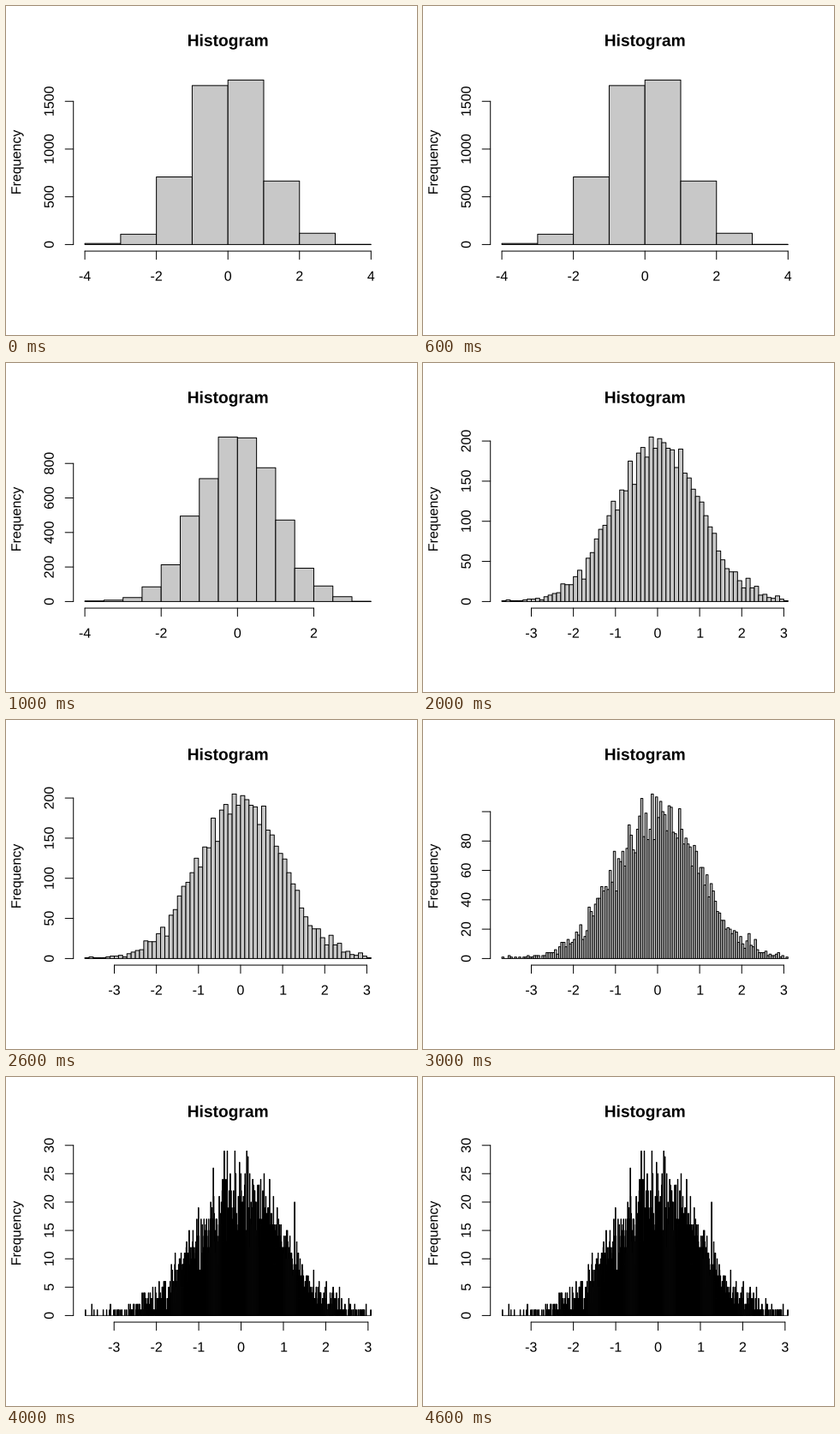
Write a matplotlib script that moves like this. It is 480 px wide and 384 px high and loops after 5000 ms.

```python
import numpy as np
import matplotlib.pyplot as plt
from matplotlib.animation import FuncAnimation
from matplotlib.collections import PolyCollection
from matplotlib.patches import PathPatch
from matplotlib.textpath import TextPath
from matplotlib.transforms import Affine2D

W, H, DPI = 480, 384, 96
LEFT, RIGHT = 92.09, 426.31      # first and last break
BASE, TOP = 278.4, 86.4          # zero and tallest bar
AXIS_X, AXIS_Y = 78.72, 286.08
TICK = 9.6
MID_X, MID_Y = 259.2, 182.4
LINE = 72 / DPI

START, STEP = -4, 0.01
# sample sizes per half unit from -4 to 3.5
HALVES = [3, 8, 23, 85, 213, 495, 712, 953, 948, 775, 472, 193, 90, 28, 1]


def sample(lo=-3.69, hi=3.07):
    """Scatter each half unit over bins of 0.01, following a normal curve."""
    rng = np.random.default_rng(7)
    x = START + STEP * (np.arange(50 * len(HALVES)) + 0.5)
    density = np.exp(-x**2 / 2) * ((x > lo) & (x < hi))
    groups = density.reshape(-1, 50)
    return np.concatenate([rng.multinomial(n, g / g.sum())
                           for n, g in zip(HALVES, groups)])


FINE = np.pad(sample(), (0, 50))


def counts(width, lo, hi, peak):
    a, b = (round((v - START) / STEP) for v in (lo, hi))
    size = round(width / STEP)
    return np.minimum(FINE[a:b].reshape(-1, size).sum(axis=1), peak)


# bin width, first break, last break, peak, x ticks, y ticks, highest y label
VIEWS = [
    (1, -4, 4, 1723, range(-4, 5, 2), range(0, 1501, 500), 1500),
    (0.5, -4, 3.5, 953, range(-4, 3, 2), range(0, 801, 200), 800),
    (0.1, -3.7, 3.1, 205, range(-3, 4), range(0, 201, 50), 200),
    (0.05, -3.7, 3.1, 112, range(-3, 4), range(0, 101, 20), 80),
    (0.01, -3.69, 3.07, 29, range(-3, 4), range(0, 31, 5), 30),
]

fig = plt.figure(figsize=(W / DPI, H / DPI), dpi=DPI, facecolor="white")
ax = fig.add_axes([0, 0, 1, 1])


def stroke(x0, y0, x1, y1):
    ax.plot([x0, x1], [y0, y1], color="black", lw=LINE,
            solid_capstyle="round", snap=False)


def label(x, y, text, size=16, weight="normal", angle=0):
    """Outline text centred on its advance width, baseline at y."""
    font = {"family": "Liberation Sans", "weight": weight}
    path = TextPath((0, 0), text, size=size, prop=font)
    twice = TextPath((0, 0), text * 2, size=size, prop=font)
    advance = twice.get_extents().x1 - path.get_extents().x1
    place = (Affine2D().translate(-advance / 2, 0).scale(1, -1)
             .rotate_deg(-angle).translate(x, y))
    ax.add_patch(PathPatch(place.transform_path(path), facecolor="black",
                           lw=0, snap=False))


def draw(i):
    width, lo, hi, peak, xticks, yticks, last = VIEWS[i]
    ax.clear()
    ax.set(xlim=(0, W), ylim=(H, 0))
    ax.axis("off")

    def px(v):
        return LEFT + (v - lo) / (hi - lo) * (RIGHT - LEFT)

    def py(n):
        return BASE - n / peak * (BASE - TOP)

    tops = py(counts(width, lo, hi, peak))
    edges = px(np.linspace(lo, hi, len(tops) + 1))
    bars = [[(a, BASE), (a, t), (b, t), (b, BASE)]
            for a, b, t in zip(edges, edges[1:], tops)]
    ax.add_collection(PolyCollection(bars, facecolor="#c8c8c8",
                                     edgecolor="black", lw=LINE,
                                     joinstyle="round", snap=False),
                      autolim=False)

    stroke(px(xticks[0]), AXIS_Y, px(xticks[-1]), AXIS_Y)
    for v in xticks:
        stroke(px(v), AXIS_Y, px(v), AXIS_Y + TICK)
        label(px(v), 320.64, str(v))

    stroke(AXIS_X, py(yticks[0]), AXIS_X, py(yticks[-1]))
    for n in yticks:
        stroke(AXIS_X - TICK, py(n), AXIS_X, py(n))
        if n <= last:
            label(55.68, py(n), str(n), angle=90)

    label(MID_X, 46.7, "Histogram", 19.2, "bold")
    label(17.28, MID_Y, "Frequency", angle=90)
    return []


anim = FuncAnimation(fig, draw, frames=len(VIEWS), init_func=lambda: [],
                     interval=1000, repeat=True, repeat_delay=0)
plt.show()
```
